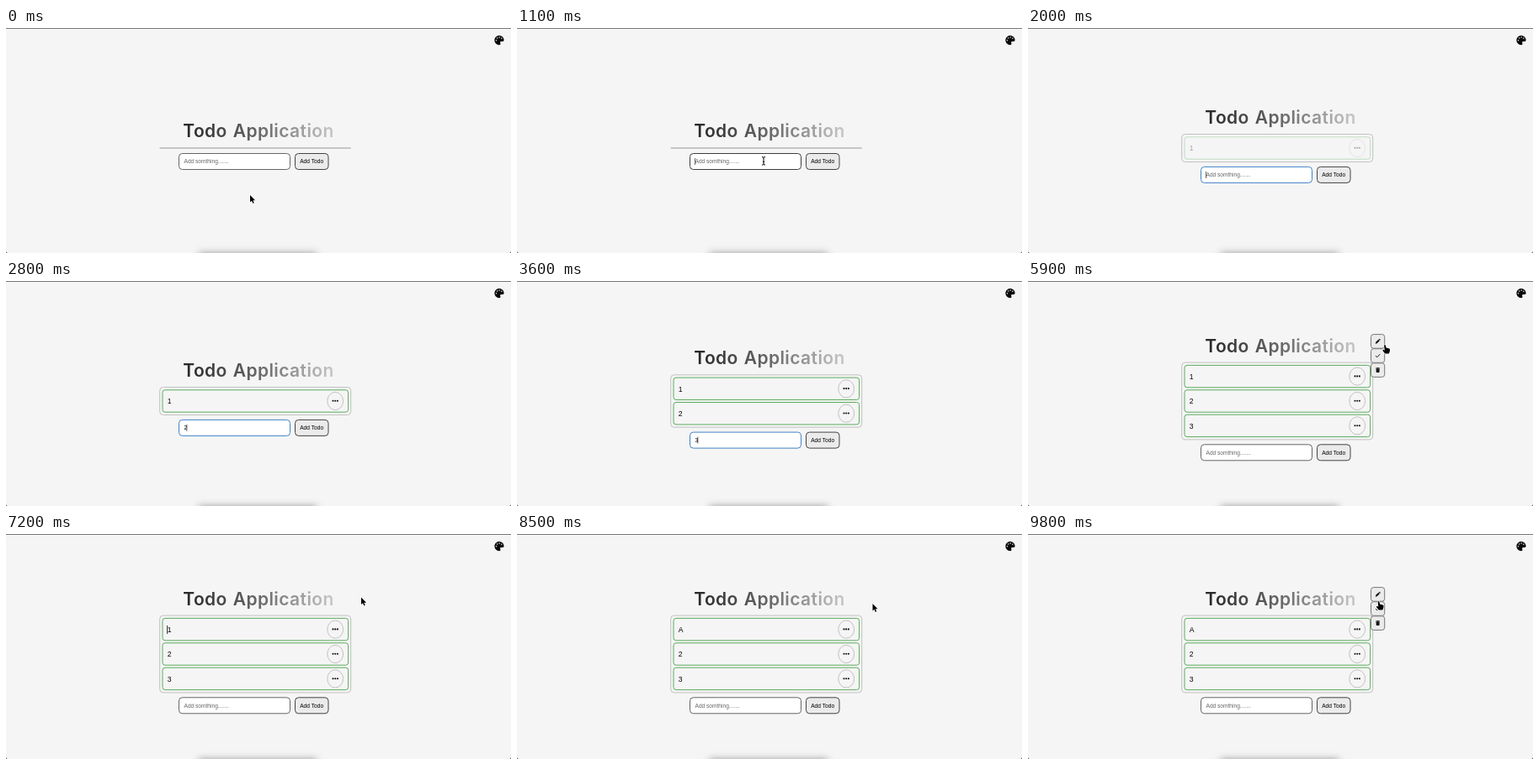
Animation of 600x268 px, one loop 10000 ms. Source, as an HTML page with a canvas:

```html
<!DOCTYPE html>
<html lang="en">
<head>
<meta charset="utf-8">
<title>Todo Application</title>
<style>
  html, body { margin: 0; width: 100%; height: 100%; overflow: hidden; background: #f5f5f5; }
  canvas { display: block; width: 600px; height: 268px; }
</style>
</head>
<body>
<canvas id="stage"></canvas>
<script>
const canvas = document.getElementById('stage');
const ctx = canvas.getContext('2d');
const dpr = window.devicePixelRatio || 1;
canvas.width = 600 * dpr;
canvas.height = 268 * dpr;

const LOOP = 10000, TICK = 100, PITCH = 29.4;
const UI = '6.6px "Liberation Sans", Arial, sans-serif';
const BODY = '8.6px "Liberation Sans", Arial, sans-serif';
const ADDED = [2000, 3000, 3700];
const FOCUS = 1100, BLUR = 4400, EDIT = 6200, COMMIT = 8500;
const MENUS = [[5000, EDIT], [9100, LOOP]];

// time, x, y, shape shown from that time on
const POINTER = [
  [0, 290, 199, 'arrow'], [800, 293, 160, 'beam'], [900, 293, 158.5, 'beam'],
  [1600, 293, 158, ''], [4200, 293, 158, 'arrow'], [4700, 390, 118, 'hand'],
  [4900, 397.5, 114, 'hand'], [5200, 397.5, 114, 'hand'], [5900, 424, 76, 'hand'],
  [6100, 424, 76, 'hand'], [EDIT, 422, 75.5, 'arrow'], [7500, 422, 75.5, ''],
  [8300, 425.5, 71, 'arrow'], [8500, 422.5, 83, 'arrow'], [8800, 400, 110, 'hand'],
  [8900, 397, 114, 'hand'], [9300, 397, 114, 'hand'], [9800, 416.5, 80, 'hand']
];

const SHAPES = {
  arrow: new Path2D('M0 0V8.6L2 6.8 3.4 9.9 4.7 9.3 3.4 6.3H6.1Z'),
  hand: new Path2D('M-.9 .8Q0-.6 .9 .8L1.6 3.8Q2.6 3.2 3.1 4.1 4.2 3.5 4.6 4.6 5.9 4.2 6 5.6L5.8 8 4.8 10.6H.2L-2.6 6.9Q-2.6 5.6-1.2 6.1L-.2 6.7Z'),
  beam: new Path2D('M-2-4.8Q0-4.8 0-3.6 0-4.8 2-4.8M0-3.6V3.6M-2 4.8Q0 4.8 0 3.6 0 4.8 2 4.8M-1 1H1')
};
const PENCIL = new Path2D('M-2.8 2.8L-2.4 .9 .7-2.2 2.2-.7-.9 2.4ZM1.1-2.5L1.7-3Q2.2-3.2 2.6-2.8L3-2.3Q3.2-1.8 2.8-1.4L2.5-1.1Z');
const CHECK = new Path2D('M-2.5 .1L-.9 1.8 2.6-1.8');
const TRASH = new Path2D('M-2.4-2.7H-.9L-.6-3.1H.6L.9-2.7H2.4V-1.9H-2.4ZM-2.1-1.5H2.1L1.8 3H-1.8Z');

const clamp = v => Math.max(0, Math.min(1, v));
const mix = (a, b, k) => a + (b - a) * k;
const blend = (a, b, k) => `rgb(${a.map((v, i) => Math.round(mix(v, b[i], k)))})`;

function box(x, y, w, h, r, stroke, fill, line = 1) {
  ctx.beginPath();
  ctx.roundRect(x, y, w, h, r);
  if (fill) { ctx.fillStyle = fill; ctx.fill(); }
  ctx.strokeStyle = stroke;
  ctx.lineWidth = line;
  ctx.stroke();
}

function text(str, x, y, font, color) {
  ctx.font = font;
  ctx.fillStyle = color;
  ctx.fillText(str, x, y);
}

function dot(x, y, r, color) {
  ctx.beginPath();
  ctx.arc(x, y, r, 0, 7);
  ctx.fillStyle = color;
  ctx.fill();
}

function rect(x, y, w, h, color) {
  ctx.fillStyle = color;
  ctx.fillRect(x, y, w, h);
}

function drawPage() {
  rect(0, 0, 600, 268, '#f5f5f5');
  rect(0, 0, 600, 1, '#777');
  // shadow rising from the bottom edge
  ctx.save();
  ctx.shadowColor = 'rgba(0,0,0,.45)';
  ctx.shadowBlur = 9 * dpr;
  rect(229, 268.5, 140, 6, '#000');
  ctx.restore();
  ctx.fillStyle = '#222';
  ctx.fill(new Path2D('M0 266Q0 268 2 268H0ZM600 266Q600 268 598 268H600Z'));
  // palette icon
  ctx.fillStyle = '#0a0a0a';
  ctx.fill(new Path2D('M586 9C582.8 9 580.4 11.6 580.4 14.6S582.8 20.2 586 20.2C587.4 20.2 587.9 19 587.3 18 586.7 16.8 587.3 15.9 588.6 15.9H590C591 15.9 591.6 15.3 591.6 14.4 591.6 11.4 589 9 586 9Z'));
  for (const [x, y] of [[582.5, 14.7], [583.6, 12], [586.2, 10.9], [588.9, 12.3]]) dot(x, y, .75, '#f5f5f5');
}

function drawTitle(y) {
  const shade = ctx.createLinearGradient(211, 0, 389, 0);
  shade.addColorStop(0, '#262626');
  shade.addColorStop(.5, '#666');
  shade.addColorStop(1, '#c8c8c8');
  ctx.letterSpacing = '.4px';
  ctx.wordSpacing = '1.3px';
  text('Todo Application', 210.3, y, '600 21px Inter, sans-serif', shade);
  ctx.letterSpacing = ctx.wordSpacing = '0px';
}

function drawItem(label, y, alpha) {
  ctx.globalAlpha = alpha;
  box(186, y, 220.6, 26.4, 3, '#5cab5e', null, 1);
  text(label, 191.7, y + 16.4, BODY, '#000');
  ctx.beginPath();
  ctx.ellipse(391.2, y + 13.2, 9.4, 10.6, 0, 0, 7);
  ctx.strokeStyle = '#b4b4b4';
  ctx.lineWidth = .8;
  ctx.stroke();
  for (const dx of [-2.7, 0, 2.7]) dot(391.2 + dx, y + 13, 1.05, '#111');
  ctx.globalAlpha = 1;
}

function drawForm(t, y) {
  const focused = t >= FOCUS && t < BLUR;
  const gray = [100, 100, 100], blue = [66, 130, 200];
  let border = blend(gray, gray, 0);
  if (focused) border = blend([60, 60, 60], blue, clamp((t - FOCUS) / 600));
  else if (t >= BLUR) border = blend(blue, gray, clamp((t - BLUR) / 400));
  box(205.5, y, 132, 19, 4, border, '#fff', 1);

  const typed = t >= 1600 && t < 2000 ? '1' : t >= 2500 && t < 3000 ? '2' : t >= 3500 && t < 3700 ? '3' : '';
  text(typed || 'Add somthing.......', 211.5, y + 11.8, UI, typed ? '#000' : '#666');
  if (focused) rect(typed ? 214.6 : 211, y + 5.5, .6, 8, '#000');

  box(343.5, y, 39.5, 19, 4, '#444', '#ebebeb');
  text('Add Todo', 349.2, y + 11.8, UI, '#000');
}

function drawMenu(age) {
  const scale = age < TICK ? .6 : age < 2 * TICK ? 1.1 : 1;
  ctx.save();
  ctx.translate(415.6, 89);
  ctx.scale(scale, scale);
  ctx.globalAlpha = age < TICK ? .5 : 1;
  [PENCIL, CHECK, TRASH].forEach((icon, i) => {
    const y = (i - 1) * 17.1;
    box(-8.1, y - 8.3, 16.2, 16.6, 3, '#777', '#ebebeb');
    ctx.save();
    ctx.translate(0, y);
    ctx.fillStyle = ctx.strokeStyle = '#111';
    if (icon === CHECK) ctx.stroke(icon);
    else ctx.fill(icon);
    ctx.restore();
  });
  ctx.restore();
}

function drawPointer(t) {
  const i = POINTER.findLastIndex(key => key[0] <= t);
  const [t0, x0, y0, shape] = POINTER[i];
  if (!shape) return;
  const [t1, x1, y1] = POINTER[i + 1] || [LOOP, x0, y0];
  // a click swaps the hand for an arrow without travel
  const k = t1 === EDIT ? 0 : (t - t0) / (t1 - t0);
  ctx.save();
  ctx.translate(mix(x0, x1, k), mix(y0, y1, k));
  ctx.lineJoin = 'round';
  ctx.strokeStyle = '#fff';
  ctx.lineWidth = shape === 'beam' ? 2 : 1.4;
  ctx.stroke(SHAPES[shape]);
  ctx.strokeStyle = ctx.fillStyle = '#000';
  ctx.lineWidth = 1;
  if (shape === 'beam') ctx.stroke(SHAPES.beam);
  else ctx.fill(SHAPES[shape]);
  ctx.restore();
}

function draw(t) {
  ctx.setTransform(dpr, 0, 0, dpr, 0, 0);
  drawPage();

  const count = ADDED.filter(at => t >= at).length;
  const height = count ? 3.6 + PITCH * count : .8;
  const top = 143 - height / 2;
  drawTitle(top - 12.6);
  box(182.7, top, 227, height, count ? 4 : .4, '#b9bdb9', null, .9);

  const first = t < 7700 ? '1' : t < 8000 ? '' : 'A';
  [first, '2', '3'].slice(0, count).forEach((label, i) =>
    drawItem(label, top + 3.3 + i * PITCH, clamp((t - ADDED[i] + TICK) / 300)));
  drawForm(t, count ? top + height + 5.9 : 149.5);

  const caretOn = t >= EDIT && t < COMMIT && !(t >= 6700 && t < 7200);
  if (caretOn) {
    const x = t >= 8000 ? 197.6 : t >= 7500 && t < 7700 ? 196.4 : 191.3;
    rect(x, 109, .8, 10, '#000');
  }
  for (const [open, close] of MENUS) if (t >= open && t < close) drawMenu(t - open);
  drawPointer(t);
}

function frame() {
  const t = performance.now() % LOOP;
  draw(Math.floor(t / TICK) * TICK);
  requestAnimationFrame(frame);
}
frame();
</script>
</body>
</html>
```
